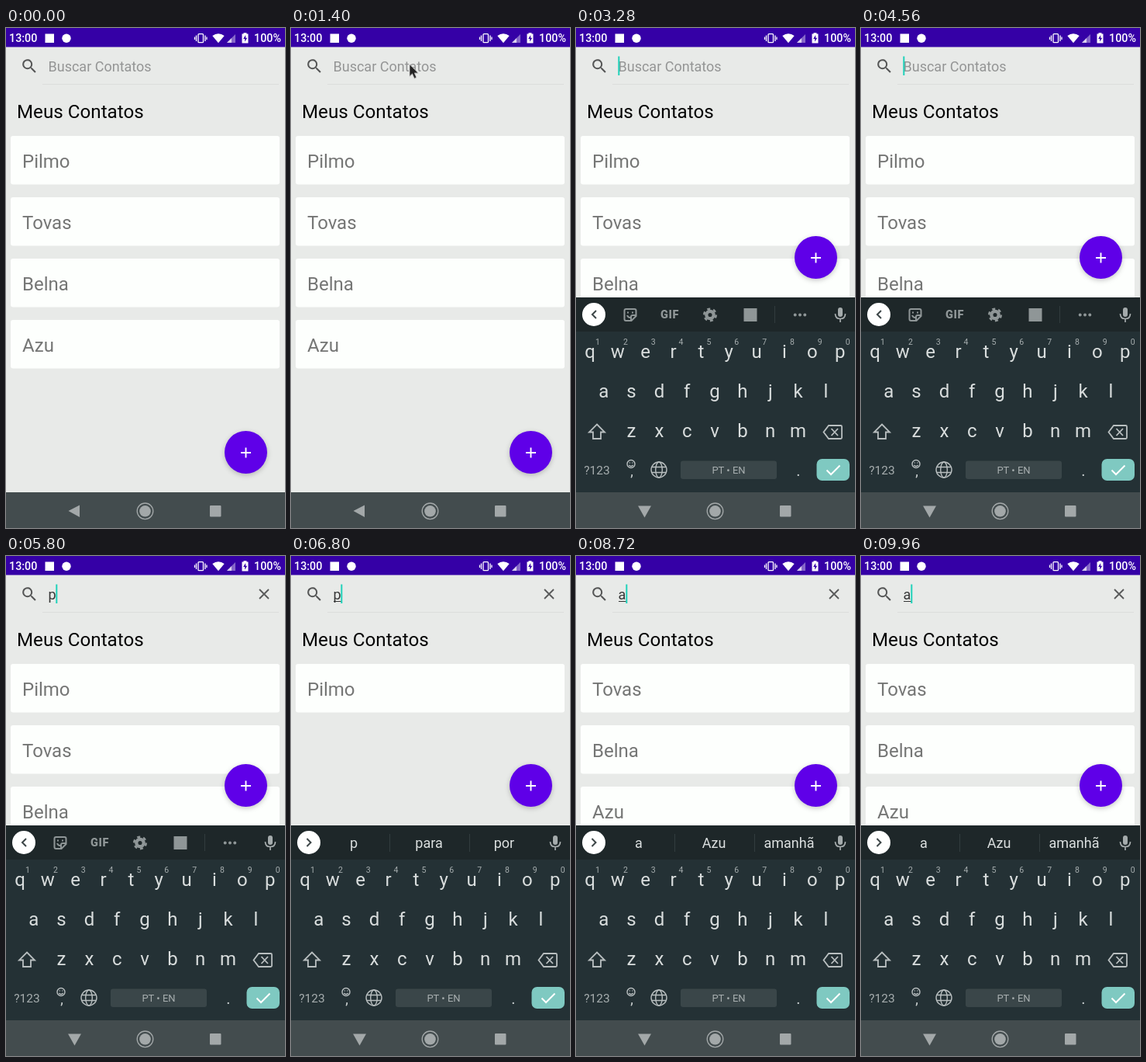
An HTML page that plays this animation: 360 by 644 pixels, repeating every 10000 ms.

```html
<!DOCTYPE html>
<html lang="pt">
<head>
<meta charset="utf-8">
<title>Contatos</title>
<style>
html, body { margin: 0; width: 100%; height: 100%; overflow: hidden; background: #e8eae8; }
svg { display: block; width: 360px; height: 644px; font-family: Roboto, sans-serif; }
.mid { text-anchor: middle; }
.line { fill: none; }

/* 1% of the loop is 100 ms */
.idle, .hint, .clear, .typeT, .typeP, .typeA, .findT, .findP, .findA,
.open, .closed, .fab, .blink, .caretX { animation: 10s step-end infinite; }
.idle { animation-name: idle; }
.hint { animation-name: hint; }
.clear { animation-name: clear; }
.typeT { animation-name: typeT; }
.typeP { animation-name: typeP; }
.typeA { animation-name: typeA; }
.findT { animation-name: findT; }
.findP { animation-name: findP; }
.findA { animation-name: findA; }
.open { animation-name: open; }
.closed { animation-name: closed; }
.fab { animation-name: fab; }
.blink { animation-name: blink; }
.caretX { animation-name: caretX; }
.keyboard { animation: slide 10s linear infinite; }
.cursor { animation: cursor 10s linear infinite; }

@keyframes idle {
  0%, 53.6%, 69.6% { opacity: 1 }
  48%, 58.4%, 86.8%, 100% { opacity: 0 }
}
@keyframes hint {
  0%, 53.6%, 69.6% { opacity: 1 }
  47.2%, 57.6%, 86%, 100% { opacity: 0 }
}
@keyframes clear {
  0%, 53.6%, 69.6% { opacity: 0 }
  47.2%, 57.6%, 86%, 100% { opacity: 1 }
}
@keyframes typeT { 0%, 53.6%, 100% { opacity: 0 } 47.2% { opacity: 1 } }
@keyframes typeP { 0%, 69.6%, 100% { opacity: 0 } 57.6% { opacity: 1 } }
@keyframes typeA { 0% { opacity: 0 } 86%, 100% { opacity: 1 } }
@keyframes findT { 0%, 53.6%, 100% { opacity: 0 } 48% { opacity: 1 } }
@keyframes findP { 0%, 69.6%, 100% { opacity: 0 } 58.4% { opacity: 1 } }
@keyframes findA { 0% { opacity: 0 } 86.8%, 100% { opacity: 1 } }
@keyframes open { 0% { opacity: 0 } 21.2%, 100% { opacity: 1 } }
@keyframes closed { 0% { opacity: 1 } 21.2%, 100% { opacity: 0 } }
@keyframes fab { 0% { transform: none } 21.2%, 100% { transform: translateY(-251px) } }
@keyframes blink {
  0%, 25.8%, 35.8%, 45.8%, 62.6%, 74.6%, 84.6%, 91% { opacity: 0 }
  20.8%, 30.8%, 40.8%, 47.2%, 67.6%, 79.6%, 86%, 96%, 100% { opacity: 1 }
}
@keyframes caretX {
  0%, 53.6%, 69.6% { transform: none }
  47.2% { transform: translateX(6px) }
  57.6%, 86%, 100% { transform: translateX(10px) }
}
@keyframes slide {
  0% { opacity: 0; transform: translateY(40px) }
  21.2% { opacity: 0; transform: translateY(40px); animation-timing-function: cubic-bezier(0, 0, .2, 1) }
  23.2%, 100% { opacity: 1; transform: none }
}
@keyframes cursor {
  0%, 9% { transform: translate(190px, -25px); animation-timing-function: ease-out }
  12.8%, 20.2% { transform: translate(153px, 46.7px) }
  22.4% { transform: translate(329.7px, 74px) }
  23.2%, 100% { transform: translate(372px, 81px) }
}
</style>
</head>
<body>
<svg viewBox="0 0 360 644">
  <rect width="360" height="644" fill="#e8eae8"/>

  <!-- search field -->
  <path d="M47 72.5H352" stroke="#dcdddc"/>
  <path transform="translate(18.2 37.2)" fill="#555656" d="M15.5 14h-.8l-.3-.3A6.5 6.5 0 1 0 13.7 14.4l.3.3v.8l5 5L20.500 19zM9.500 14a4.500 4.500 0 1 1 0-9a4.500 4.500 0 0 1 0 9z"/>
  <path class="line clear" d="M327 43l12 12M339 43l-12 12" stroke="#5a5b5b" stroke-width="1.9"/>
  <g font-size="18" fill="#353636">
    <text class="hint" x="54.5" y="56" fill="#949595">Buscar Contatos</text>
    <text class="typeT" x="54.5" y="56">t</text>
    <text class="typeP" x="54.5" y="56">p</text>
    <text class="typeA" x="54.5" y="56">a</text>
    <rect class="findT" x="55" y="58" width="6" height="1"/>
    <rect class="findP" x="55" y="58" width="10" height="1"/>
    <rect class="findA" x="55" y="58" width="10" height="1"/>
  </g>
  <g class="caretX"><rect class="blink" x="54.3" y="36.5" width="2" height="24.5" fill="#20d2ba"/></g>

  <text x="14" y="116" font-size="24.2" fill="#060606">Meus Contatos</text>
  <g id="lists" font-size="24" fill="#757675"></g>

  <rect class="open" y="347" width="360" height="252" fill="#fafafa"/>

  <g class="fab">
    <circle cx="309.5" cy="546.5" r="27.5" fill="#5f00e8" style="filter: drop-shadow(0 2.5px 3px rgba(0,0,0,.22))"/>
    <path d="M303 547h13M309.5 540.5v13" stroke="#fff" stroke-width="1.9"/>
  </g>

  <g class="keyboard">
    <rect y="347" width="360" height="300" fill="#243135"/>
    <rect y="347" width="360" height="44" fill="#1e2729"/>
    <circle cx="23" cy="369" r="15" fill="#fff"/>

    <!-- toolbar -->
    <g class="idle" fill="#8f9697">
      <g class="line" stroke="#8f9697" stroke-width="2">
        <path d="M26 364l-5 5 5 5" stroke="#3d4648"/>
        <path d="M64.5 362h11q2 0 2 2v7l-6 6h-7q-2 0-2-2v-11q0-2 2-2zM77 370h-4q-2 0-2 2v4M66 370q1 3 4 3M66 366.5h2M72 366.5h2"/>
        <circle cx="173" cy="369.5" r="4.7" stroke-width="4.3"/>
        <circle cx="173" cy="369.5" r="7.7" stroke-width="2.6" stroke-dasharray="4.03"/>
        <path d="M256.5 358v22" stroke="#323c3e" stroke-width="1"/>
        <path d="M282.7 369.500h13" stroke-width="4" stroke-linecap="round" stroke-dasharray="0 6.3"/>
      </g>
      <text class="mid" x="121" y="374.3" font-size="14.5" font-weight="900" letter-spacing=".6">GIF</text>
      <rect x="216.5" y="361" width="17" height="17"/>
    </g>
    <g id="strips" font-size="18" fill="#dce0e0"></g>
    <rect x="338" y="360" width="6" height="12" rx="3" fill="#a5abac"/>
    <path class="line" d="M334.5 368q0 6.500 6.500 6.500t6.500-6.500M341 374.500v4.500" stroke="#a5abac" stroke-width="1.7"/>

    <g id="keys" class="mid" font-size="24" fill="#d9dddd"></g>

    <g class="line" stroke="#b9bfc0" stroke-width="1.8">
      <path d="M27 510.5L37 520.5H32V529H22V520.5H17z"/>
      <path d="M326 512h15.500q1.500 0 1.500 1.500v14q0 1.500-1.500 1.500H326l-6.500-8.500zM329.500 516l8.500 9M338 516l-8.500 9"/>
    </g>
    <g class="line" stroke="#b9bfc0" stroke-width="1.4">
      <circle cx="71" cy="561.5" r="5"/>
      <path d="M68.3 563q2.700 3 5.400 0M68.800 560h1M72.300 560h1"/>
      <circle cx="107" cy="569" r="10"/>
      <ellipse cx="107" cy="569" rx="4.3" ry="10"/>
      <path d="M98 565.5h18M98 572.5h18"/>
    </g>
    <rect x="135" y="557.5" width="124" height="23.5" rx="3" fill="#3a4649"/>
    <g class="mid" fill="#a7aeaf">
      <text x="27" y="575" font-size="15.5">?123</text>
      <text x="197" y="574" font-size="13">PT • EN</text>
      <text x="72" y="577" font-size="18" fill="#d0d5d5">,</text>
      <text x="287" y="577" font-size="20" fill="#d0d5d5">.</text>
    </g>
    <rect x="310.5" y="555" width="42.5" height="28" rx="7" fill="#7fc9c1"/>
    <path class="line" d="M323.5 569.5l5.500 5.500L340.500 563.500" stroke="#fff" stroke-width="2"/>
  </g>

  <!-- navigation bar -->
  <rect y="598" width="360" height="46" fill="#434c4e"/>
  <g fill="#a3a8a9">
    <path class="closed" d="M80.5 622L95 614.500v15.500z"/>
    <path class="open" d="M80 615.5h17L88.500 630.500z"/>
    <circle cx="179.5" cy="622.3" r="7.3"/>
    <circle class="line" cx="179.5" cy="622.3" r="10.3" stroke="#a3a8a9" stroke-width="1.3"/>
    <rect x="263" y="615" width="14.5" height="14.5" rx="1"/>
  </g>

  <!-- status bar -->
  <rect width="360" height="24.5" fill="#3500a6"/>
  <g fill="#fff">
    <g font-size="14.3" font-weight="500"><text x="4" y="18.3">13:00</text><text x="320" y="18.3">100%</text></g>
    <rect x="50.5" y="7.5" width="11.5" height="11.5"/>
    <circle cx="78" cy="13.2" r="5.7"/>
    <g class="line" stroke="#fff" stroke-width="1.3">
      <rect x="248" y="7.7" width="6.5" height="11" rx="1"/>
      <path d="M245.5 9.500v7.500M257 9.500v7.500M243.500 11.500v3.500M259 11.500v3.500"/>
    </g>
    <path d="M266.3 10Q274 4.700 281.700 10L274 19.300z"/>
    <path d="M296 8v11h-11z" opacity=".4"/>
    <path d="M291 13v6h-6z" opacity=".7"/>
    <path d="M306.5 7.500V6.200h4v1.300h2V19.500h-8V7.500z"/>
    <path d="M309.2 9l-3 5h2v3.800l3-5h-2z" fill="#3500a6"/>
  </g>

  <path class="cursor" d="M0 0V15.500l3.500-3.300 2.700 6 2.700-1.200-2.600-5.800H11.200z" fill="#232323" stroke="#d0d0d0" stroke-width=".7"/>
</svg>
<script>
const fill = (id, html) => { document.getElementById(id).innerHTML = html; };

const cards = (cls, names) => `<g class="${cls}">` + names.map((name, i) => {
  const y = 139 + 79 * i;
  return `<rect x="6" y="${y}" width="347" height="62.5" rx="3" fill="#fdfffd"/>
    <text x="21" y="${y + 40.8}">${name}</text>`;
}).join('') + '</g>';

const strip = (cls, words) => `<g class="${cls}">
  <path class="line" d="M20.5 364l5 5-5 5" stroke="#3d4648" stroke-width="2"/>
  <path d="M127.5 358v23M230.5 358v23" stroke="#323c3e"/>` +
  words.map((word, i) => `<text class="mid" x="${81 + 97 * i}" y="376">${word}</text>`).join('') + '</g>';

const row = (letters, x, y) => [...letters].map((c, i) =>
  `<text x="${x + 35.85 * i}" y="${y}">${c}</text>`).join('');

const digits = [...'1234567890'].map((d, i) =>
  `<text x="${28 + 35.85 * i}" y="408" font-size="10.5" fill="#a7aeaf">${d}</text>`).join('');

fill('lists',
  cards('idle', ['Pilmo', 'Tovas', 'Belna', 'Azu']) +
  cards('findT', ['Tovas']) +
  cards('findP', ['Pilmo']) +
  cards('findA', ['Tovas', 'Belna', 'Azu']));

fill('strips',
  strip('findT', ['t', 'tem', 'te']) +
  strip('findP', ['p', 'para', 'por']) +
  strip('findA', ['a', 'Azu', 'amanhã']));

fill('keys',
  row('qwertyuiop', 18, 425) + digits +
  row('asdfghjkl', 35.7, 475.5) +
  row('zxcvbnm', 71.5, 527));
</script>
</body>
</html>
```
